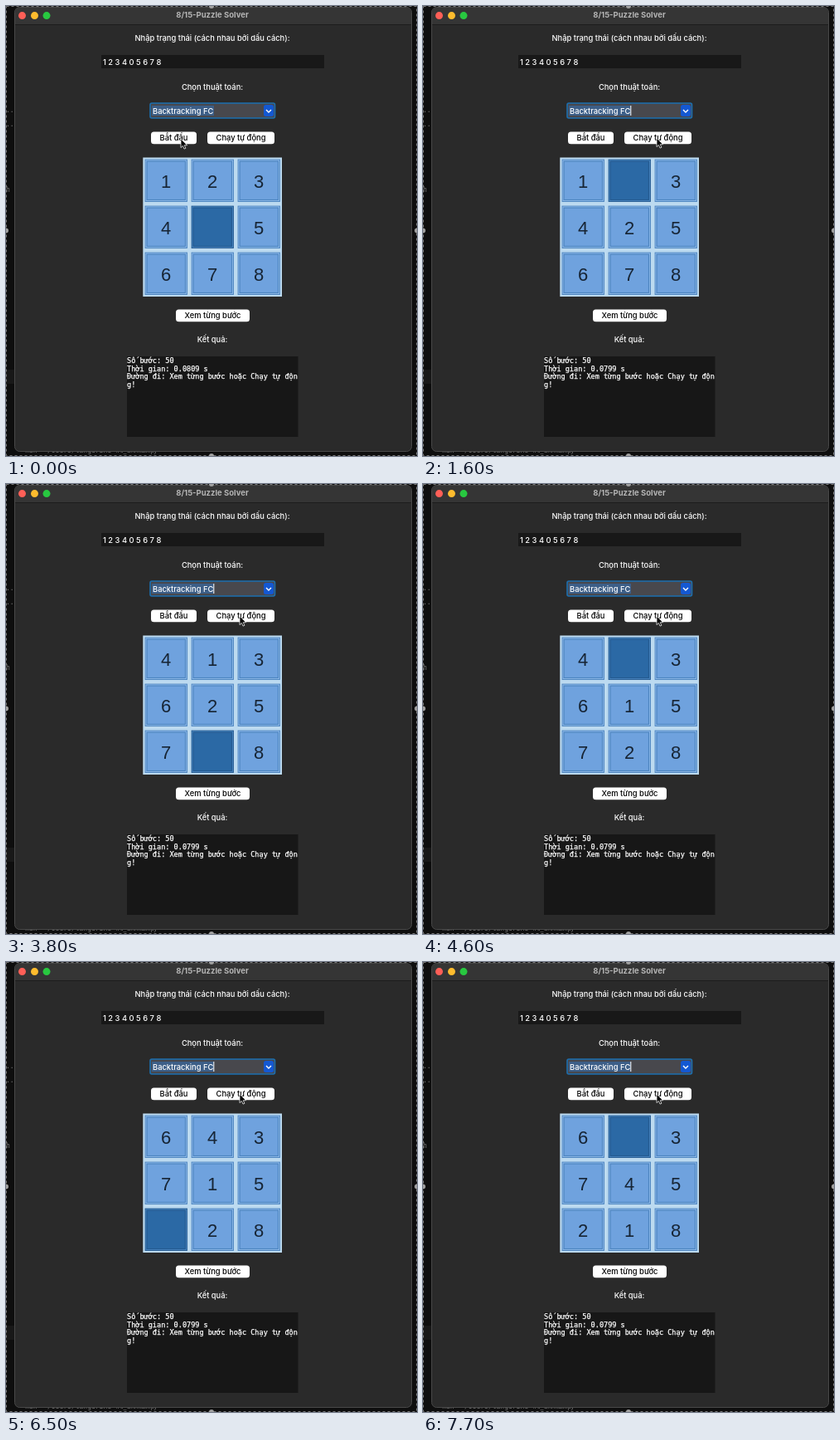
An HTML page for the animation above (8000 ms loop, 496 by 542 pixels).

```html
<!DOCTYPE html>
<html lang="vi">
<head>
<meta charset="utf-8">
<title>8/15-Puzzle Solver</title>
<style>
html, body { margin: 0; width: 496px; height: 542px; overflow: hidden; background: #0e0e0e; }
svg { display: block; }
text { font: 500 9.35px Inter, "Open Sans", sans-serif; fill: #fff; white-space: pre; }
.mid { text-anchor: middle; }
.title { font-size: 9.5px; font-weight: 700; fill: #b4b4b4; }
.button rect { fill: #fff; }
.button text { fill: #000; text-anchor: middle; }
.log text { font: 8.55px "DejaVu Sans Mono", "Liberation Mono", monospace; stroke: #fff; stroke-width: .25; }
.behind text { font: 8px "DejaVu Sans Mono", monospace; fill: #777; }
.behind .small { font: 7px "Liberation Sans", sans-serif; }
.tile rect { fill: #6fa2de; stroke: #4a82bd; }
.tile .gap { fill: none; stroke: #8db8e8; }
.tile text { font: 22px "Liberation Sans", Arial, sans-serif; fill: #172535; text-anchor: middle; }
.blank rect { fill: #2b69a5; stroke: #24598f; }
.blank .gap { stroke: #4a86bf; }
</style>
</head>
<body>
<svg width="496" height="542" viewBox="0 0 496 542">
  <rect width="496" height="542" fill="#0e0e0e"/>
  <g class="behind">
    <rect y="438" width="10" height="17" fill="#181818"/>
    <text x="0" y="128">..</text>
    <text x="0" y="145">..</text>
    <text x="0" y="223.5">h</text>
    <text x="23" y="538">nan</text>
    <text x="50" y="538">/Users/tangerine</text>
    <text x="133" y="538" class="small">/AI_GK/main.py</text>
  </g>
  <rect x="10.5" y="1.5" width="479" height="535" rx="6" fill="#2a2a2a" stroke="#484848"/>
  <path d="M11 22V7q0-5 5-5H484q5 0 5 5V22z" fill="#353535"/>
  <path d="M11 22.5H489" stroke="#1c1c1c"/>
  <rect x=".5" y=".5" width="495" height="541" fill="none" stroke="#777" stroke-dasharray="3 3"/>
  <g fill="#a0a0a0">
    <circle cx="0" cy="270.5" r="3"/><circle cx="496" cy="270.5" r="3"/>
    <circle cx="248" cy="0" r="3"/><circle cx="248" cy="542" r="3"/>
  </g>
  <circle cx="19.5" cy="11.6" r="4.5" fill="#ff5f57"/>
  <circle cx="34.5" cy="11.6" r="4.5" fill="#febc2e"/>
  <circle cx="49" cy="11.6" r="4.5" fill="#28c840"/>
  <text class="mid title" x="249" y="13.8">8/15-Puzzle Solver</text>

  <text class="mid" x="249" y="41.6">Nhập trạng thái (cách nhau bởi dấu cách):</text>
  <rect x="115" y="59" width="269" height="16" fill="#181818"/>
  <text x="117" y="70.5">1 2 3 4 0 5 6 7 8</text>

  <text class="mid" x="249" y="100.7">Chọn thuật toán:</text>
  <rect x="174" y="117" width="150.5" height="18" rx="2" fill="#48484d" stroke="#1b6fb0" stroke-width="1.6"/>
  <rect x="176" y="120" width="75" height="12" fill="#3d5f88"/>
  <text x="177" y="129.5">Backtracking FC</text>
  <rect id="caret" x="250.3" y="120" width="1" height="12" fill="#fff"/>
  <rect x="311" y="119" width="12" height="14" rx="2.5" fill="#1458d2"/>
  <path d="M314 125l3 3 3-3" fill="none" stroke="#fff" stroke-width="1.4"/>

  <g class="button">
    <rect x="175" y="151.4" width="55" height="14.8" rx="3.5"/><text x="202.5" y="161.8">Bắt đầu</text>
    <rect x="243" y="151.4" width="81" height="14.8" rx="3.5"/><text x="283.5" y="161.8">Chạy tự động</text>
    <rect x="205" y="365.4" width="89" height="14.8" rx="3.5"/><text x="249.5" y="375.8">Xem từng bước</text>
  </g>
  <rect x="165.3" y="182.5" width="167.7" height="167.5" fill="#bcdaf0"/>
  <g id="board"></g>

  <text class="mid" x="249" y="404.7">Kết quả:</text>
  <rect x="146" y="422" width="206.5" height="97" fill="#171717"/>
  <g class="log">
    <text x="146" y="430.2">Số bước: 50</text>
    <text id="time" x="146" y="439.8"></text>
    <text x="146" y="449.3">Đường đi: Xem từng bước hoặc Chạy tự độn</text>
    <text x="146" y="459">g!</text>
  </g>
  <path id="cursor" d="M0 0V10.6L2.4 8.4 4 12.1 5.9 11.3 4.3 7.7H7.6Z" fill="#080808" stroke="#eee" stroke-width=".8"/>
</svg>
<script>
const LOOP = 8000;
const START = [1, 2, 3, 4, 0, 5, 6, 7, 8];
// Cells the blank visits, one per autoplay step
const PATH = [1, 0, 3, 6, 7, 4, 1, 0, 3, 6, 7, 4, 1];
const SIZE = 51.3;
const $ = id => document.getElementById(id);

$('board').innerHTML = START.map((_, i) => {
  const x = 167.6 + i % 3 * 56, y = 184.6 + Math.floor(i / 3) * 56;
  const box = (inset, name) => `<rect class="${name}" x="${inset}" y="${inset}" width="${SIZE - 2 * inset}" height="${SIZE - 2 * inset}"/>`;
  return `<g class="tile" transform="translate(${x} ${y})">${box(.5, 'outer')}${box(1.5, 'gap')}${box(2.5, 'inner')}<text x="25.5" y="34.2"></text></g>`;
}).join('');
const tiles = [...$('board').children];

function boardAfter(steps) {
  const cells = [...START];
  let blank = 4;
  for (const next of PATH.slice(0, steps)) {
    cells[blank] = cells[next];
    cells[next] = 0;
    blank = next;
  }
  return cells;
}

function draw(now) {
  const t = Math.floor(now % LOOP / 100) * 100;
  const steps = Math.max(0, Math.floor((t - 1540) / 510) + 1);
  boardAfter(steps).forEach((n, i) => {
    tiles[i].classList.toggle('blank', !n);
    tiles[i].lastChild.textContent = n || '';
  });
  $('caret').style.display = t >= 200 && (t - 200) % 900 < 600 ? '' : 'none';
  $('time').textContent = `Thời gian: ${t < 500 ? '0.0809' : '0.0799'} s`;
  const p = Math.min(1, Math.max(0, (t - 600) / 600));
  const ease = p * p * (3 - 2 * p);
  $('cursor').setAttribute('transform', `translate(${211 + 71 * ease} ${160 - ease})`);
}

function tick() {
  draw(performance.now());
  requestAnimationFrame(tick);
}
tick();
</script>
</body>
</html>
```
